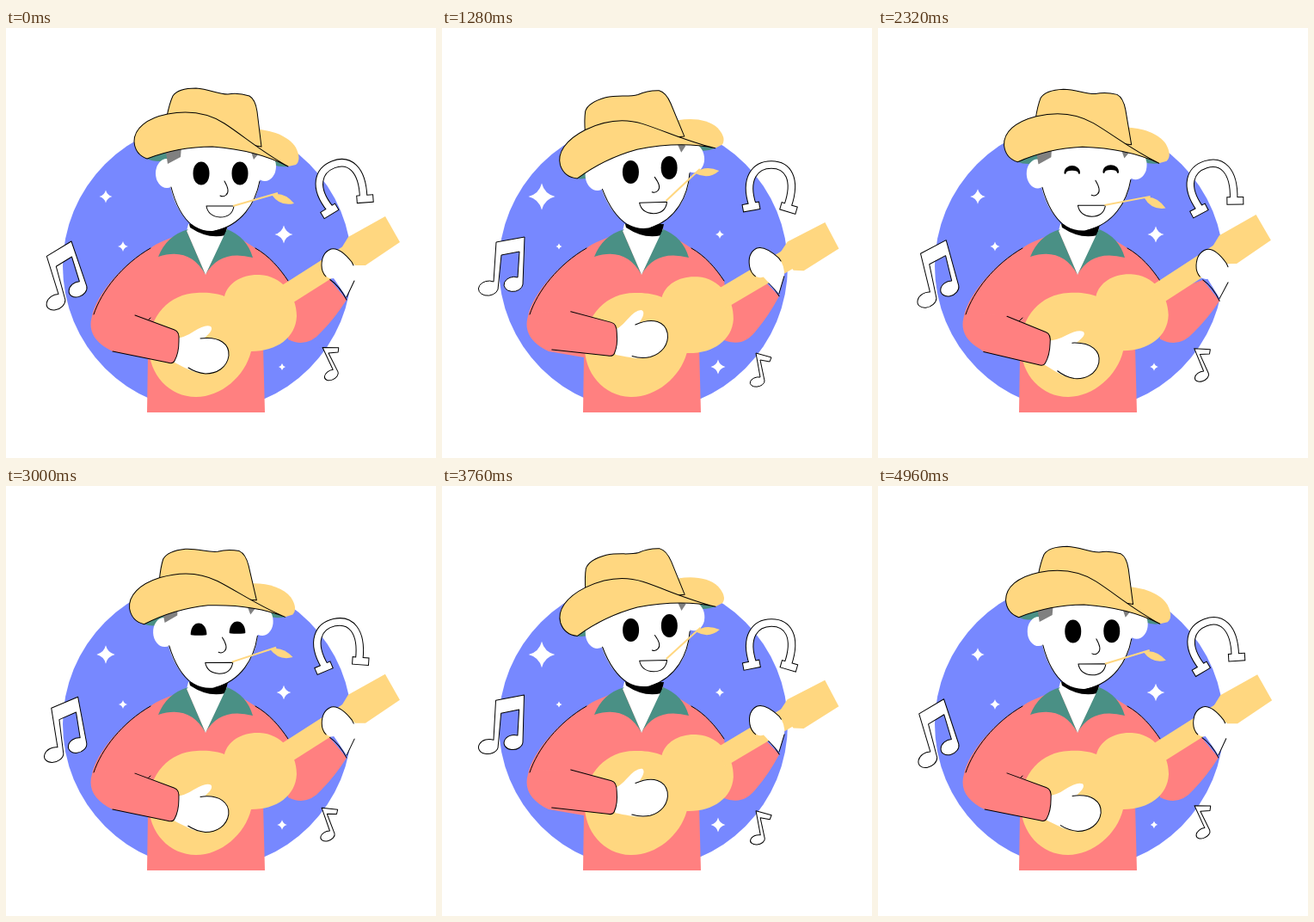
An HTML page for the animation above (5000 ms loop, 500x500 px).

```html
<!DOCTYPE html>
<html>
<head>
<meta charset="utf-8">
<style>
  html, body { margin: 0; width: 100%; height: 100%; overflow: hidden; background: #fff; }
  svg { display: block; width: 100vw; height: 100vh; }
  .blue { fill: #7788ff; }
  .pink { fill: #ff8080; }
  .yellow { fill: #ffd780; }
  .green { fill: #4a9085; }
  .gray { fill: #808080; }
  .white { fill: #fff; }
  .line { fill: none; stroke: #000; stroke-width: 1; stroke-linecap: round; stroke-linejoin: round; }
  .edge { stroke: #000; stroke-width: 1; stroke-linejoin: round; }
</style>
</head>
<body>
<svg viewBox="0 0 500 500">
  <defs>
    <path id="star" class="white" d="M0-1Q.2-.2 1 0Q.2 .2 0 1Q-.2 .2-1 0Q-.2-.2 0-1Z"/>
    <g id="shoe" fill="none" stroke-linecap="square">
      <path d="M361 206C351 175 364 159 383 159C402 159 413 175 402 207"/>
      <path d="M354 209L365 207M398 208L408 211"/>
    </g>
  </defs>

  <circle class="blue" cx="234" cy="277" r="168"/>
  <g id="stars"></g>

  <g id="notes" class="white edge">
    <path fill-rule="evenodd" d="M63 249L96 243L94 298A11 8.500 -8 1 1 88 290L90 260L69 264L65 304A11.500 8.500 -8 1 1 60 295Z"/>
  </g>
  <g id="horseshoe">
    <use href="#shoe" stroke="#000" stroke-width="9.500"/>
    <use href="#shoe" stroke="#fff" stroke-width="7.500"/>
  </g>
  <path id="note" class="white edge" d="M365 378L383 383L381 388L370 386L375 410A8.500 5.500 -12 1 1 370 406Z"/>

  <path class="pink" d="M213 235C190 245 175 250 168 256C135 275 105 310 100 335C95 352 103 366 124 376L165 383L164 447H301L299 370L335 340L328 294C318 279 306 265 290 256L257 235Z"/>
  <path class="line" d="M168 256C135 275 111 306 102 333M290 256C306 265 318 279 328 294M164 341L168 337"/>
  <g class="fretArm">
    <path class="pink" d="M328 310L376 292L396 316Q382 338 367 353Q350 373 328 362L320 320Z"/>
    <path class="line" d="M376 292Q388 300 396 316"/>
  </g>

  <path class="white" d="M212 228H257V236L232 287L210 236Z"/>
  <path d="M213 228H258L255 241Q235 246 214 232Z"/>
  <path class="green" d="M212 234Q187 241 177 266Q214 254 232 287L210 236ZM257 234Q280 243 287 267Q248 257 232 287L255 238Z"/>

  <g id="guitar" class="yellow">
    <path d="M222 308C235 307 247 309 254 312C258 296 275 286 295 287C320 288 338 310 338 335C337 360 315 376 285 376C278 405 250 429 221 429C190 429 166 403 166 370C166 335 190 309 222 308Z"/>
    <path d="M318 301L398 250L407 273L328 323Z"/>
    <path d="M398 243L441 219L458 249L418 276H406L390 256Z"/>
  </g>
  <g class="fretArm"><g id="fretHand">
    <path class="white" d="M396 313L405 294Q408 282 402 272C394 262 386 255 378 257C370 260 367 268 367 276C368 286 374 293 381 291Z"/>
    <path class="line" d="M396 313L405 294M404 276L402 272C394 262 386 255 378 257C370 260 367 268 367 276Q367 284 372 289"/>
  </g></g>

  <g id="forearm">
    <g id="hand">
      <path class="white" d="M196 361Q208 360 218 353Q232 344 238 347Q242 351 231 360C249 359 260 368 259 381C257 395 245 402 232 402C218 401 210 396 194 388Z"/>
      <path class="line" d="M226 361C249 358 260 368 259 381C257 395 245 402 232 402Q221 401 212 395"/>
    </g>
    <path class="pink" d="M116 332L150 334L196 351Q202 353 201 364Q201 378 196 387Q194 391 188 389L124 376L106 362Z"/>
    <path class="line" d="M150 334L196 351Q202 353 201 364Q201 378 196 387Q194 391 188 389L124 376"/>
  </g>

  <path class="hat green" d="M164 152Q175 158 200 152H300Q312 163 328 161L290 138L200 132Z"/>
  <g id="head">
    <g class="white">
      <ellipse cx="187" cy="169" rx="13" ry="17"/>
      <ellipse cx="301" cy="161" rx="13" ry="17"/>
      <path d="M189 135V170C192 207 212 237 240 236C275 231 294 200 296 172V135Z"/>
    </g>
    <path class="line" d="M192 185C197 205 206 221 217 230M295 178C290 204 274 229 243 236"/>
    <path class="gray" d="M185 138H204L203 150L188 158ZM283 138L294 146L288 153Z"/>
    <g transform="translate(227 169)"><path class="eye"/></g>
    <g transform="translate(272 169)"><path class="eye"/></g>
    <path class="line" d="M254 178Q261 190 256 194Q253 197 249 195"/>
    <path id="mouth" class="white edge" d="M233 207H265Q263 220 249 220Q235 219 233 207Z"/>
    <g id="straw">
      <path d="M264 207L316 192" fill="none" stroke="#ffd780" stroke-width="2"/>
      <path class="yellow" d="M309 194Q323 190 335 204Q319 208 309 194Z"/>
    </g>
  </g>
  <g class="hat">
    <path class="yellow" d="M280 118C303 116 328 124 337 139Q344 153 337 159L328 161L280 140Z"/>
    <path class="yellow edge" d="M187 103Q190 88 194 79Q200 70 221 70C237 71 246 77 258 77Q270 75 283 79Q290 83 292 97L297 138L250 130Z"/>
    <path class="yellow" d="M188 100C163 105 149 117 149 132Q150 147 164 152Q200 138 240 138Q292 142 328 161C297 144 277 126 254 111Q226 93 188 100Z"/>
    <path class="line" d="M164 152Q150 147 149 132C149 117 163 105 188 100Q226 93 254 111C277 126 297 144 328 161M164 152Q200 138 240 138Q292 142 328 161"/>
  </g>
</svg>
<script>
const LOOP = 5000;
const swayKeys = [[0, 0], [1200, 1], [1290, 1], [2530, 0], [3730, 1], [LOOP, 0]];
const strumKeys = [[0, 0], [1300, .75], [2550, -.45], [3800, .75], [LOOP, 0]];
const blinkKeys = [[0, 0], [1900, 0], [2300, 1], [2900, 1], [3320, 0], [LOOP, 0]];
// x, y, radius at both ends of the sway
const stars = [[116, 196, 7.5, 15.5], [323, 240, 10.5, 5], [136, 254, 6, 3.5], [321, 394, 4, 8.5]];

const all = selector => document.querySelectorAll(selector);
const setAll = (selector, name, value) => all(selector).forEach(el => el.setAttribute(name, value));
const spin = (selector, angle, x = 0, y = 0) => setAll(selector, 'transform', `rotate(${angle} ${x} ${y})`);

all('#stars')[0].innerHTML = stars.map(() => '<use href="#star"/>').join('');
const starEls = all('#stars use');

function at(keys, t) {
  const i = keys.findIndex(key => key[0] > t);
  const [t0, v0] = keys[i - 1], [t1, v1] = keys[i];
  return v0 + (v1 - v0) * (t - t0) / (t1 - t0);
}

function eyePath(blink) {
  const w = 9.5 - 1.3 * blink;
  const base = 24 * blink * (1 - blink);
  const top = base - (13.5 - 6 * blink ** 6) * 4 / 3;
  const bottom = base + (13.5 - 17.5 * blink) * 4 / 3;
  return `M${-w} ${base}C${-w} ${top} ${w} ${top} ${w} ${base}C${w} ${bottom} ${-w} ${bottom} ${-w} ${base}Z`;
}

function draw(t) {
  const sway = at(swayKeys, t), strum = at(strumKeys, t), blink = at(blinkKeys, t);

  spin('#head', -6.5 * sway, 210, 235);
  spin('#mouth', 5 * sway, 249, 207);
  spin('.eye', 6.5 * sway);
  spin('.hat', -15.5 * sway, 245, 188);
  spin('#straw', -28 * strum, 264, 207);
  spin('#notes', -21 * (1 - sway), 99.5, 299.5);
  spin('#horseshoe', -21 * (1 - sway), 381, 165);
  spin('#note', -15 * (1 - sway), 342, 363);

  spin('#guitar', 2.4 * strum, 220, 365);
  spin('#forearm', -7.3 * strum, 105, 335);
  spin('#hand', -15 * strum, 200, 372);
  spin('.fretArm', -6 * strum, 340, 365);
  spin('#fretHand', -6 * strum, 396, 312);

  setAll('.eye', 'd', eyePath(blink));
  setAll('.eye', 'stroke', '#000');
  setAll('.eye', 'stroke-linejoin', 'round');
  setAll('.eye', 'stroke-width', 2.2 * blink);
  stars.forEach(([x, y, r0, r1], i) =>
    starEls[i].setAttribute('transform', `translate(${x} ${y}) scale(${r0 + (r1 - r0) * sway})`));
}

function tick() {
  draw(performance.now() % LOOP);
  requestAnimationFrame(tick);
}
tick();
</script>
</body>
</html>
```
